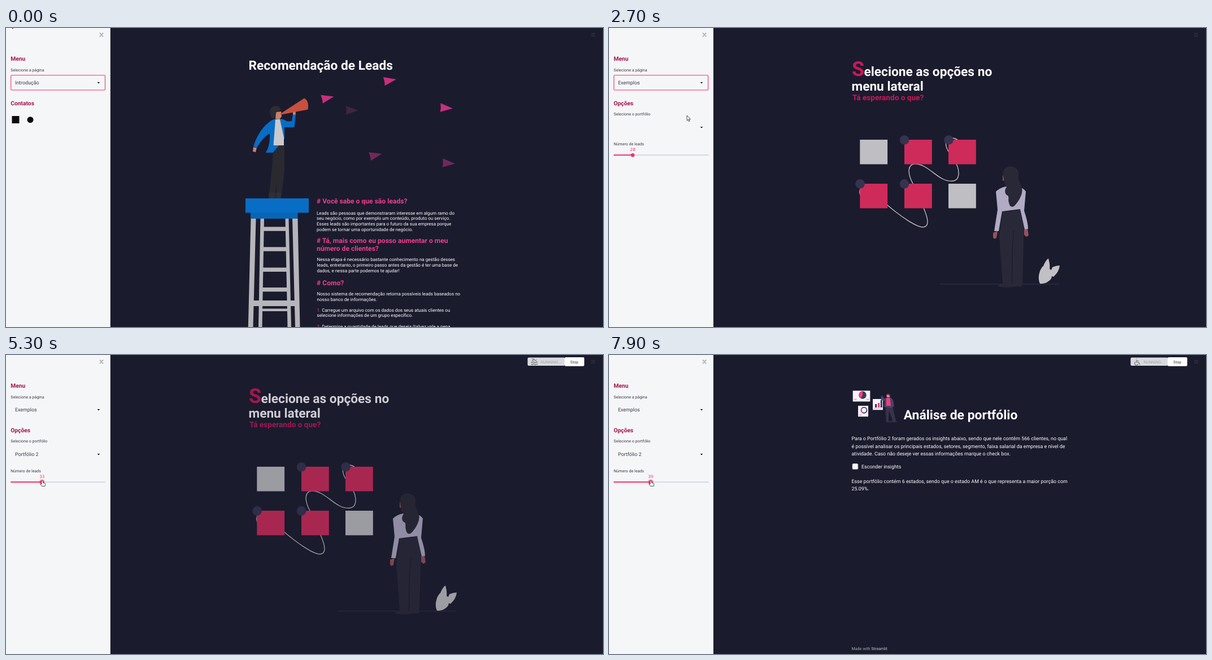
These frames come from a looping animation (1057x530 px, 8 s). An HTML page:

```html
<!DOCTYPE html>
<html lang="pt">
<head>
<meta charset="utf-8">
<title>Recomendação de Leads</title>
<style>
  html, body { margin: 0; width: 100%; height: 100%; overflow: hidden; background: #1b1b2e; }
  svg { display: block; }
  text { font-family: Roboto, "Open Sans", sans-serif; text-rendering: geometricPrecision; }
  .mono { font-family: "Noto Sans Mono", monospace; }
  .line { fill: none; stroke-linecap: round; stroke-linejoin: round; }
</style>
</head>
<body>
<svg id="stage" width="1057" height="530" viewBox="0 0 1057 530"></svg>
<script>
const LOOP = 8000;
const INK = '#3a3c47', WINE = '#a3154f', RED = '#f63366', PINK = '#ee3f8e', PAPER = '#f5f6f8';
const BLUE = '#086dc4', SKIN = '#c9826b', GREY = '#b6b6ba', CRIMSON = '#cf2b5a';

// Markup helpers
const text = (x, y, size, str, fill = '#fff', extra = '') =>
  `<text x="${x}" y="${y}" font-size="${size}" fill="${fill}" ${extra}>${str}</text>`;
const bold = (x, y, size, str, fill, extra = '') => text(x, y, size, str, fill, 'font-weight="700" ' + extra);
const lines = (x, y, step, size, rows) => rows.map((row, i) => text(x, y + i * step, size, row)).join('');
const rect = (x, y, w, h, fill, extra = '') =>
  `<rect x="${x}" y="${y}" width="${w}" height="${h}" fill="${fill}" ${extra}/>`;
const path = (d, fill, extra = '') => `<path d="${d}" fill="${fill}" ${extra}/>`;
const line = (d, color, width, extra = '') =>
  `<path class="line" d="${d}" stroke="${color}" stroke-width="${width}" ${extra}/>`;
const disc = (x, y, r, fill, extra = '') => `<circle cx="${x}" cy="${y}" r="${r}" fill="${fill}" ${extra}/>`;
const group = (id, body, extra = '') => `<g id="${id}" ${extra}>${body}</g>`;

function introPage() {
  const plane = ([x, y, turn, color]) =>
    `<g transform="translate(${x} ${y}) rotate(${turn})">` +
    path('M-22 -8L0 0L-22 7.5L-21.2 1Z', color) + '</g>';
  const planes = [
    [691, 91, -10, '#c6307c'], [580.5, 121.5, -13, '#c6307c'], [624, 146, 0, '#3f2441'],
    [791, 142.5, 3, '#c6307c'], [665.5, 223, -13, '#712a58'], [795, 240.5, 3, '#712a58']
  ].map(plane).join('');
  const rungs = [352.5, 388.3, 424.7, 460].map(y => rect(453, y, 47, 7.3, GREY)).join('');
  const stool =
    path('M433.5 338H442.5L437.5 530H428.8ZM450.5 338H457L453.5 530H447ZM494.5 338H500.5L505 530H498.5ZM507 338H516.5L520.5 530H512Z', GREY) +
    rungs + rect(433, 483, 84, 10, GREY) + rect(450, 497.5, 52, 4.5, GREY) +
    rect(433, 327, 83.5, 11, '#0765b5') + rect(424, 302, 112, 25.5, BLUE);
  const man =
    path('M472 207H492.5C494 235 493 262 490 278L486 305H478L480 272L475 305H465C468 265 474 240 472 207Z', '#2a292f') +
    path('M465.5 292H488L486 305H465Z', '#3a3941', 'opacity=".4"') +
    path('M471 163Q478 160 490 161.5L498 165.5L506 165L508 153H513L510.5 176H493V196L472.5 221H460Q468 208 467 187Q456 192 444 212L438 210Q448 178 471 163Z', BLUE) +
    path('M477 162H485L492 194V208H473.5Z', '#c9c9ce') +
    path('M478 149L487 148L488 157L484 162L477 161Z', SKIN) +
    path('M467.5 151C466 142 473 137 477 138.5C481 136.5 486 140 487 147Q480 146 478 151L475 160.5C470 160 468 156 467.5 151Z', '#2e2c31') +
    path('M485 152.5L528 124.5Q537 129 534.5 144.5L486 153.8Z', '#c8503e') +
    path('M508 149L512.5 148L513 153L508 154Z', SKIN) + path('M438 211L444 212.5L442 220L437 219Z', SKIN);
  const size = 8.08, x = 550.5, num = n => `<tspan fill="${PINK}">${n}.</tspan> `;
  return planes + man + stool +
    bold(429.5, 73.5, 22.7, 'Recomendação de Leads') +
    bold(550, 310.5, 12.1, '# Você sabe o que são leads?', PINK) +
    lines(x - .5, 330.6, 9.75, size, [
      'Leads são pessoas que demonstraram interesse em algum ramo do',
      'seu negócio, como por exemplo um conteúdo, produto ou serviço.',
      'Esses leads são importantes para o futuro da sua empresa porque',
      'podem se tornar uma oportunidade de negócio.']) +
    bold(550, 380.7, 12.1, '# Tá, mais como eu posso aumentar o meu', PINK) +
    bold(550, 394.5, 12.1, 'número de clientes?', PINK) +
    lines(x, 413.4, 9.75, size, [
      'Nessa etapa é necessário bastante conhecimento na gestão desses',
      'leads, entretanto, o primeiro passo antes da gestão é ter uma base de',
      'dados, e nessa parte podemos te ajudar!']) +
    bold(550, 456, 12.1, '# Como?', PINK) +
    lines(x, 474, 9.6, size, [
      'Nosso sistema de recomendação retorna possíveis leads baseados no',
      'nosso banco de informações.', '',
      num(1) + 'Carregue um arquivo com os dados dos seus atuais clientes ou',
      'selecione informações de um grupo específico.', '',
      num(2) + 'Determine a quantidade de leads que deseja (talvez vale a pena']);
}

function waitPage() {
  const tiles = [444.3, 523, 601].flatMap((x, i) => [198, 276].map((y, j) =>
    rect(x, y, 48.8, 43.5, i === j * 2 ? '#bfbfc3' : CRIMSON))).join('');
  const dots = [[523, 198.5], [601.5, 198.5], [444.6, 276.3], [523, 276.3]]
    .map(([x, y]) => disc(x, y, 8.3, '#363350')).join('');
  const wire = line('M446 283Q442 289 445 296M493 314C520 337 545 353 556 353C568 352 565 338 557 319' +
    'M538 276C527 255 530 242 541 241C567 240 583 275 610 271C621 269 621 254 615 241' +
    'M601 219C595 209 593 194 606 195Q613 195 618 199', '#c5c5c9', 1.3);
  const woman =
    path('M697 325Q714 326 728 321L735 340L732 455Q733 459 722 458L714 459Q700 461 688 458Q688 455 697 453L691 370Z', '#292839') +
    line('M716.5 360L714 398L713.5 452', '#1b1b2e', 1.2) +
    path('M680 363L688 360L686 372Q681 376 680 370ZM735 357L741 356L743 367Q739 373 735 366Z', '#96525a') +
    path('M685 290Q692 283 703 281L722 281Q734 283 738 290L735 324Q742 345 742 356L736 357L728 321L696 325L690 360L682 360L688 322Z', '#b1acc4') +
    path('M697 260L702 272L697 270Z', '#96525a') +
    path('M698 262C696 250 703 245 711 245.5C722 246 726 253 725 262C724 268 728 274 730 281C735 290 727 305 720 313C714 320 709 317 708 309C706 306 709 300 706 297C700 295 700 286 704 282C700 276 699 270 698 262Z', '#292836');
  const leaf = path('M763 453C757 440 765 424 769 422C773 412 777 409 778 408.5C780 416 781 422 780 427L783 429L785 424Q792 421 798 421Q797 432 787 441L784 440L783 444C778 451 770 454 763 453Z', '#c1c1c5');
  return bold(430, 84.5, 36, 'S', '#c8185a') +
    bold(451.5, 84.5, 22.7, 'elecione as opções no') + bold(429.5, 111, 22.7, 'menu lateral') +
    bold(431, 128.2, 13.6, 'Tá esperando o que?', '#c8185a') +
    wire + tiles + dots + line('M587 454H797', '#33324a', 1.2) + leaf + woman;
}

function reportPage() {
  const card = (x, y, w, h) => rect(x, y, w, h, '#f4f3f6');
  const art =
    card(431.7, 63.3, 30.6, 19.2) + disc(449, 71, 6.7, '#3d3760') +
    path('M449 71V64.3A6.7 6.7 0 0 0 446 77Z', '#f0417f') + line('M434 78.5H438M456 78.5H460', '#8a8796', .8) +
    card(441, 90, 18, 19.2) + disc(451.5, 97.8, 5, 'none', 'stroke="#3d3760" stroke-width="1.8"') +
    line('M447 95.5A5 5 0 0 0 449 102', '#f0417f', 1.8) + line('M443 106.5H447', '#8a8796', .8) +
    card(467, 78, 18, 19.3) + rect(471, 87, 3.2, 6, '#3d3760') + rect(476, 85, 3.2, 8, '#f0417f') +
    rect(480.7, 79.5, 3.2, 13.5, '#3d3760') + line('M469 94.5H484', '#8a8796', .6) +
    `<ellipse cx="500" cy="118" rx="11" ry="1.8" fill="#2d2b42"/>` +
    path('M489 90H502L508 118H503L496 99L494.5 118H491Z', '#37344a') +
    path('M481.5 73L484.5 72.5L487 77L492 75.5H499Q504.5 78 504.5 91L500 94L487 92L488 82L482 79Z', '#4b4168') +
    path('M491 76H497.5L499 90H491Z', '#ee3f7f') + disc(494.5, 72, 3.2, '#d98a8f') +
    path('M491 71Q492 67 496 68Q499 70 497 73L495 70Z', '#4a2639');
  return art + bold(521.7, 113.5, 22.9, 'Análise de portfólio') +
    lines(429.5, 150.8, 13.8, 8.88, [
      'Para o Portfólio 2 foram gerados os insights abaixo, sendo que nele contêm 566 clientes, no qual',
      'é possível analisar os principais estados, setores, segmento, faixa salarial da empresa e nível de',
      'atividade. Caso não deseje ver essas informações marque o check box.']) +
    rect(431, 192.7, 9.8, 9.8, PAPER, 'rx="1.5" stroke="#b8b9c2" stroke-width=".8"') +
    text(447, 201, 8.88, 'Esconder insights') +
    lines(429.5, 226.6, 13.8, 8.88, [
      'Esse portfólio contém 6 estados, sendo que o estado AM é o que representa a maior porção com',
      '25.09%.']) +
    text(429.5, 523.4, 7.14, 'Made with <tspan fill="#c3cbd6">Streamlit</tspan>', '#abacb4');
}

const select = (id, y) =>
  rect(8.7, y - .2, 166.8, 26.2, 'none', `id="${id}Box" rx="1.5" stroke="${RED}" stroke-width="1.1"`) +
  text(16, y + 16, 8.88, '', INK, `id="${id}"`) +
  rect(0, y + 7.5, .8, 11.5, INK, `id="${id}Caret"`) +
  path(`M161.6 ${y + 12}h4.6l-2.3 2.4z`, '#111');

const menu = (id, y, items) => group(id,
  rect(8.5, y, 167, 75, '#fff', 'rx="2" filter="url(#shadow)"') +
  rect(8.5, 0, 167, 22, '#e9ebf0', `id="${id}Hover"`) +
  items.map((s, i) => text(16, y + 18.5 + i * 22, 8.88, s, INK)).join(''));

function sidebar() {
  const label = (y, s) => text(8.3, y, 7.1, s, INK);
  return rect(0, 0, 184.8, 530, PAPER) +
    line('M166.4 9.3L171.6 14.7M171.6 9.3L166.4 14.7', '#b3b5bb', 2) +
    bold(8.2, 58, 10.3, 'Menu', WINE) + label(76.6, 'Selecione a página') + select('page', 84) +
    group('contacts', bold(8.2, 137, 10.3, 'Contatos', WINE) +
      rect(10.5, 156, 13, 13, '#0c0c10') + disc(43, 162.7, 5.5, '#0c0c10')) +
    group('options', bold(8.2, 137, 10.3, 'Opções', WINE) +
      label(155.3, 'Selecione o portfólio') + select('folio', 163) + label(208.2, 'Número de leads') +
      line('M9 225.3H175.5', '#d3d7e6', 2) + line('', RED, 2, 'id="fill"') +
      disc(0, 225.3, 5.2, RED, 'id="glow" opacity=".35"') + disc(0, 225.3, 3.4, RED, 'id="thumb"') +
      text(0, 217.6, 7.6, '', RED, 'id="value" class="mono" text-anchor="middle"')) +
    menu('pageMenu', 111.5, ['Introdução', 'Exemplos', 'Recomendações']) +
    menu('folioMenu', 191, ['', 'Portfólio 1', 'Portfólio 2']);
}

function runStatus() {
  const icons = [
    'M931 14.5a2.6 2.6 0 1 0 .1 0M939.5 14.5a2.6 2.6 0 1 0 .1 0M931 17L934 11.5L937.5 14V17M934 11.5L937 9L939 11H941M937.3 6.2v.1',
    'M934 6.5v.1M934 9V13H938L940 17M934.5 10.5H937.5M932 12A3.3 3.3 0 1 0 937 16',
    'M930 13q1.5 1.5 3 0t3 0t3 0t2 0M930 16.5q1.5 1.5 3 0t3 0t3 0t2 0M931 11L935 8L939 11M931 7H935M939.5 8v.1'];
  return rect(923.5, 4.5, 66, 14.5, '#d9dade', 'rx="2"') +
    icons.map((d, i) => line(d, '#777982', 1.2, `id="icon${i}"`)).join('') +
    text(946.7, 14.6, 7.1, 'RUNNING...', '#a4a5ae') +
    rect(989, 4, 34.8, 15.7, '#fff', 'rx="2"') + text(999, 14.5, 7, 'Stop', INK);
}

document.getElementById('stage').innerHTML =
  '<defs><filter id="shadow" x="-10%" y="-20%" width="120%" height="150%">' +
  '<feDropShadow dx="0" dy="2" stdDeviation="3.5" flood-color="#000" flood-opacity=".16"/></filter></defs>' +
  rect(0, 0, 1057, 530, '#1b1b2e') +
  line('M1036.5 9.5H1042.5M1036.5 12H1042.5M1036.5 14.5H1042.5', '#34343f', 1) +
  group('intro', introPage()) + group('wait', waitPage()) + group('report', reportPage()) +
  group('status', runStatus()) + sidebar() +
  group('arrow', path('M0 0V9.2L2.1 7.3L3.6 10.7L5 10L3.5 6.8H6.4Z', '#fff', 'stroke="#222" stroke-width=".8"')) +
  group('hand', path('M0 0Q1.3 0 1.3 1.3V4L4.6 4.8Q5.6 5.2 5.3 7L4.6 10H-.8L-3.2 6.6Q-3 5.4 -1.3 6.2V1.3Q-1.3 0 0 0Z', '#fff', 'stroke="#222" stroke-width=".8"'));

const el = id => document.getElementById(id);
const fade = (id, a) => { el(id).style.opacity = a; };
const show = (id, on) => { el(id).style.display = on ? '' : 'none'; };
const set = (id, name, v) => el(id).setAttribute(name, v);
const within = (t, a, b) => t >= a && t < b;

// Linear interpolation through [time, ...values] keys
function track(keys, t) {
  const i = keys.findIndex(k => k[0] > t);
  if (i === 0) return keys[0].slice(1);
  if (i < 0) return keys[keys.length - 1].slice(1);
  const [a, b] = [keys[i - 1], keys[i]], p = (t - a[0]) / (b[0] - a[0]);
  return a.slice(1).map((v, j) => v + (b[j + 1] - v) * p);
}

const POINTER = [[100, 8, -9.5], [200, 55, 36], [300, 106, 80], [700, 104, 112], [900, 90, 130], [1400, 66, 150],
  [1500, 66, 150], [1600, 68, 152], [2100, 68, 152], [2200, 79, 154], [2400, 92, 150], [2700, 138, 155],
  [3200, 110, 186], [3400, 92, 214], [3500, 92, 214], [3900, 46, 248], [4200, 43, 244], [4300, 38, 234],
  [4400, 38, 232], [4600, 41, 224]];
const LEADS = [[4600, 20], [4900, 28], [5000, 28], [5700, 39], [5900, 42], [6300, 42], [6600, 41], [6700, 41],
  [7000, 39], [7100, 39], [7400, 38], [7600, 40], [7700, 40], [7800, 39]];
const STATUS = [[2200, 0], [2400, .12], [2600, 0], [4200, 0], [4300, .12], [4600, 1]];
const MENU1 = [[600, 0], [700, .5], [800, 1], [1700, 1], [1800, .5], [1900, 0]];
const MENU2 = [[3100, 0], [3200, .5], [3300, 1], [4000, 1], [4100, .5], [4200, 0]];
const HELD = [50, 61, 67, 71, 77];   // ticks on which the screen does not refresh

function drawSelect(id, str, focused, caret) {
  el(id).textContent = str;
  show(id + 'Box', focused);
  show(id + 'Caret', caret);
  if (caret) set(id + 'Caret', 'x', 16.8 + el(id).getComputedTextLength());
}

function draw(time) {
  let tick = Math.floor(time / 100);
  if (HELD.includes(tick)) tick--;
  const t = tick * 100;

  show('intro', t < 2500);
  show('wait', within(t, 2500, 6200));
  show('report', t >= 6200);
  fade('wait', track([[5000, 1], [5900, .35]], t)[0]);
  show('contacts', t < 2500);
  show('options', t >= 2500);
  drawSelect('page', t < 1600 ? 'Introdução' : 'Exemplos', t < 3200, within(t, 1600, 2500));
  drawSelect('folio', t < 4000 ? '' : 'Portfólio 2', within(t, 3200, 4600), within(t, 4000, 4500));

  fade('pageMenu', track(MENU1, t)[0]);
  fade('folioMenu', track(MENU2, t)[0]);
  const [x, y] = track(POINTER, t);
  const row = (top, n) => top + 4.5 + 22 * Math.max(0, Math.min(n, Math.floor((y - top - 4.5) / 22)));
  set('pageMenuHover', 'y', row(111.5, 2));
  set('folioMenuHover', 'y', row(191, 2));

  const leads = Math.round(track(LEADS, t)[0]), knob = 8.4 + 1.676 * leads;
  const dragging = t >= 4700;
  set('fill', 'd', `M9 225.3H${knob}`);
  set('thumb', 'cx', knob);
  set('glow', 'cx', knob);
  show('glow', dragging);
  set('value', 'x', knob);
  el('value').textContent = leads;

  fade('status', track(STATUS, t)[0]);
  for (let i = 0; i < 3; i++) show('icon' + i, tick % 3 === i);

  const hidden = within(t, 400, 700) || within(t, 2800, 3200);
  const overMenu = within(t, 700, 1900) || within(t, 3200, 4200);
  show('arrow', !hidden && !overMenu && !dragging);
  show('hand', overMenu || dragging);
  set('arrow', 'transform', `translate(${x} ${y})`);
  set('hand', 'transform', dragging ? `translate(${knob + .5} 222.5)` : `translate(${x} ${y})`);
}

const start = performance.now();
function frame() {
  draw((performance.now() - start) % LOOP);
  requestAnimationFrame(frame);
}
frame();
</script>
</body>
</html>
```
